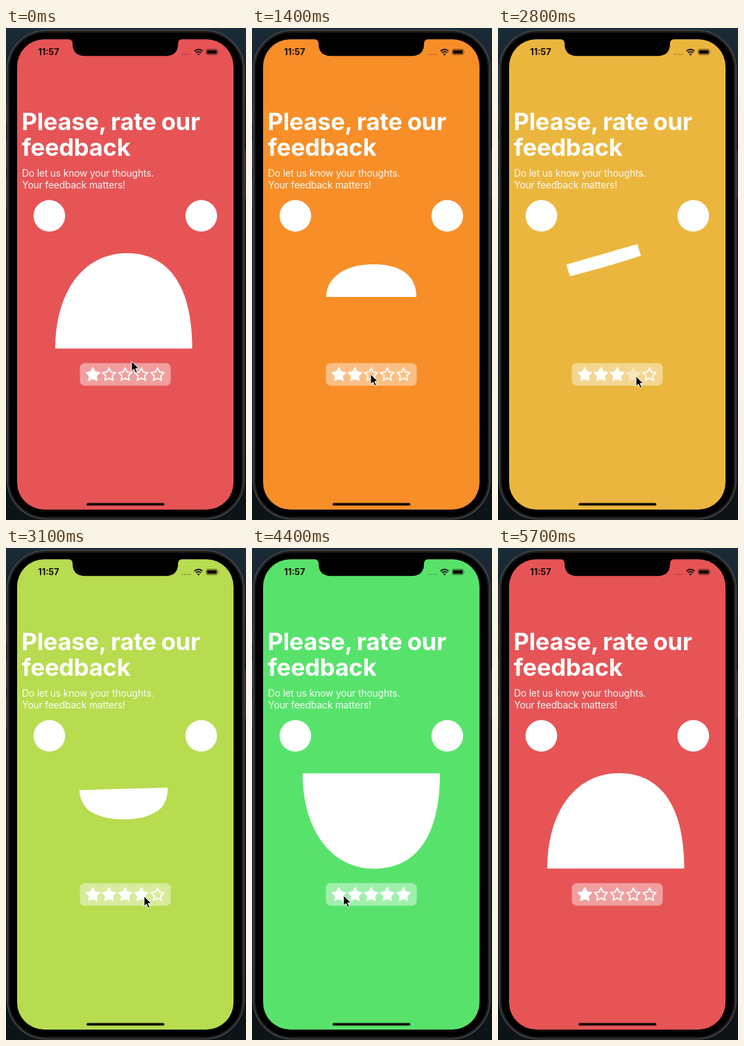
An HTML page for the animation above (5.8 s loop, 346 px wide and 708 px high).

```html
<!DOCTYPE html>
<html lang="en">
<head>
<meta charset="utf-8">
<title>Rate our feedback</title>
<style>
  html, body { margin: 0; width: 100%; height: 100%; overflow: hidden; background: #11181e; }
  svg { display: block; width: 346px; height: 708px; }
  text { font-family: Inter, Roboto, sans-serif; fill: #fff; }
  .title { font-size: 34.5px; font-weight: 700; letter-spacing: -.2px; word-spacing: -1px; }
  .note { font-size: 13.8px; letter-spacing: -.15px; fill-opacity: .92; }
  .clock { font-size: 12.6px; font-weight: 700; fill: #160c08; }
</style>
</head>
<body>
<svg viewBox="0 0 346 708" xmlns="http://www.w3.org/2000/svg">
  <defs>
    <linearGradient id="wall" x2="0" y2="1">
      <stop offset="0" stop-color="#1a2c39"/>
      <stop offset=".2" stop-color="#15191b"/>
      <stop offset="1" stop-color="#0c1417"/>
    </linearGradient>
  </defs>
  <rect width="346" height="708" fill="url(#wall)"/>
  <path d="M1 112v24M1 160v42M1 216v42M345 176v70" stroke="#292b2d" stroke-width="2"/>
  <rect x="2" y="3.5" width="341" height="703" rx="56" fill="#000" stroke="#4b4c4d" stroke-width="1.5"/>
  <rect x="4" y="5.5" width="337" height="699" rx="54" fill="none" stroke="#202122" stroke-width="2"/>

  <rect id="screen" x="16" y="16.3" width="312" height="676.7" rx="39"/>
  <path d="M90 16Q96 16.5 96 22.5Q96 40.2 114 40.2H230Q248 40.2 248 22.5Q248 16.5 254 16Z"/>

  <text class="clock" x="46.3" y="39.3">11:57</text>
  <g fill="#160c08">
    <g opacity=".35">
      <circle cx="254.5" cy="38" r="1"/><circle cx="258" cy="38" r="1"/>
      <circle cx="261.5" cy="38" r="1"/><circle cx="265" cy="38" r="1"/>
    </g>
    <path d="M275.6 37.6Q277.5 36 279.4 37.6L277.5 39.7Z"/>
    <path d="M273.8 35.7Q277.5 32.5 281.2 35.7M271.7 33.3Q277.5 28.3 283.3 33.3" fill="none" stroke="#160c08" stroke-width="1.8"/>
    <rect x="288.5" y="30.5" width="16.5" height="8" rx="2.4" fill="none" stroke="#160c08" stroke-opacity=".5"/>
    <rect x="289.7" y="31.7" width="14.1" height="5.6" rx="1.3"/>
    <path d="M306 33q1.6 1.5 0 3z" opacity=".6"/>
  </g>

  <text class="title" x="22.5" y="147">Please, rate our</text>
  <text class="title" x="22.8" y="183.6">feedback</text>
  <text class="note" x="23" y="213.6">Do let us know your thoughts.</text>
  <text class="note" x="23.3" y="231.2">Your feedback matters!</text>

  <circle cx="62.5" cy="270.3" r="22.8" fill="#fff"/>
  <circle cx="281.5" cy="270.3" r="22.8" fill="#fff"/>
  <path id="mouth" fill="#fff"/>

  <rect x="106.5" y="482.3" width="131" height="32.5" rx="7" fill="#fff" fill-opacity=".43"/>
  <g id="stars" stroke="#fff" stroke-linejoin="round"></g>
  <path d="M118 685.4H226.5" stroke="#120b09" stroke-width="3.7" stroke-linecap="round"/>
  <path id="cursor" d="M0 0V14.5L3.4 11.4L5.9 17L8.3 15.9L5.9 10.5H10.5Z" fill="#000" stroke="#fff" stroke-width="1" stroke-linejoin="round"/>
</svg>
<script>
const LOOP = 5800, STEP = 100, MORPH = 500;
const $ = id => document.getElementById(id);
const mix = (a, b, u) => a + (b - a) * u;
const mixPoint = (p, q, u) => p.map((v, i) => mix(v, q[i], u));
const easeInOut = u => u < .5 ? 2 * u * u : 1 - 2 * (1 - u) ** 2;
const smooth = u => u * u * (3 - 2 * u);

const colors = [[230, 84, 86], [247, 142, 40], [238, 180, 60], [176, 225, 81], [87, 227, 107]];

// [time, new rating]
const taps = [[0, 1], [590, 2], [1590, 3], [2720, 4], [3770, 5], [4923, 1]];

// [time, x, y] of the pointer tip
const pointer = [
  [0, 181, 479.5], [300, 142, 498], [1000, 142, 498], [1400, 171, 498],
  [2200, 171, 498], [2600, 199, 501], [3300, 199, 501], [3700, 217, 500],
  [4000, 217, 500], [4400, 132, 500], [4600, 125, 499], [4900, 125, 499],
  [5100, 157, 568], [5400, 215, 712]
];

// Every mouth is a closed ring of six cubic curves, so any two can be blended.
function split([a, b, c, d], t) {
  const ab = mixPoint(a, b, t), bc = mixPoint(b, c, t), cd = mixPoint(c, d, t);
  const l = mixPoint(ab, bc, t), r = mixPoint(bc, cd, t);
  return [a, ab, l, mixPoint(l, r, t), r, cd, d];
}
const line = (p, q) => [p, mixPoint(p, q, 1 / 3), mixPoint(p, q, 2 / 3)];

// The lip is slightly lopsided: its lowest point sits right of the centre.
const tip = [.045, 1];
const leftLip = split([[-1, 0], [-1, .6], [-.58, 1], tip], .42);
const rightLip = split([[1, 0], [1, .62], [.69, 1], tip], .42);
const smileRing = [
  ...line([-1, 0], [0, 0]), ...line([0, 0], [1, 0]),
  ...rightLip.slice(0, 6),
  ...leftLip.slice(1).reverse()
];
const flipped = [...smileRing, smileRing[0]].map(([x, y]) => [x, 1 - y]).reverse().slice(0, 18);
const frownRing = [...flipped.slice(3), ...flipped.slice(0, 3)];

const place = (ring, left, top, width, height) =>
  ring.map(([x, y]) => [left + (x + 1) / 2 * width, top + y * height]);

function bar(a, b, c, d) {
  const corners = [a, mixPoint(a, b, .5), b, c, mixPoint(c, d, .5), d];
  return corners.flatMap((p, i) => line(p, corners[(i + 1) % 6]));
}

const mouths = [
  place(frownRing, 71, 324, 197.5, 137.3),
  place(frownRing, 107, 340, 130, 47),
  bar([98, 340], [199, 309], [205, 325], [103, 356]),
  place(smileRing, 107, 349.5, 130.5, 47.5),
  place(smileRing, 73, 324.2, 198, 137.3)
];

function ringPath(ring) {
  const pts = ring.map(p => p.map(v => v.toFixed(2)).join(" "));
  return `M${pts[0]}C${pts.slice(1).join(" ")} ${pts[0]}Z`;
}

const starPath = Array.from({ length: 10 }, (_, i) => {
  const r = i % 2 ? 4.9 : 9.9, a = i * Math.PI / 5;
  return `${i ? "L" : "M"}${(r * Math.sin(a)).toFixed(2)} ${(-r * Math.cos(a)).toFixed(2)}`;
}).join("") + "Z";

const stars = colors.map((_, i) => {
  const star = document.createElementNS("http://www.w3.org/2000/svg", "path");
  star.setAttribute("d", starPath);
  star.setAttribute("transform", `translate(${125.2 + i * 23.3} 499)`);
  return $("stars").appendChild(star);
});

function drawStars(from, to, age) {
  stars.forEach((star, i) => {
    const on = i < to;
    let alpha = 1;
    if (on && i >= from) alpha = Math.min(1, age / 200);
    else if (on && to < from) alpha = Math.min(1, .5 + age / 500);
    star.setAttribute("fill", on ? "#fff" : "none");
    star.setAttribute("stroke-width", on ? 2 : 1.8);
    star.setAttribute("opacity", alpha);
  });
}

function drawPointer(t) {
  const next = pointer.findIndex(k => k[0] > t);
  $("cursor").style.display = next < 0 ? "none" : "";
  if (next < 0) return;
  const a = pointer[next - 1], b = pointer[next];
  const [, x, y] = mixPoint(a, b, smooth((t - a[0]) / (b[0] - a[0])));
  $("cursor").setAttribute("transform", `translate(${x} ${y})`);
}

function draw(t) {
  const n = taps.findLastIndex(k => k[0] <= t);
  const [start, to] = taps[n];
  const from = n ? taps[n - 1][1] : to;
  const age = t - start;
  const u = easeInOut(Math.min(1, age / MORPH));

  const level = mix(from, to, u) - 1;
  const low = Math.min(3, Math.floor(level));
  const rgb = mixPoint(colors[low], colors[low + 1], level - low);
  $("screen").setAttribute("fill", `rgb(${rgb.map(Math.round)})`);

  const ring = mouths[from - 1].map((p, i) => mixPoint(p, mouths[to - 1][i], u));
  $("mouth").setAttribute("d", ringPath(ring));

  drawStars(from, to, age);
  drawPointer(t);
}

const began = performance.now();
function tick() {
  const t = (performance.now() - began) % LOOP;
  draw(Math.floor(t / STEP) * STEP);
  requestAnimationFrame(tick);
}
tick();
</script>
</body>
</html>
```
